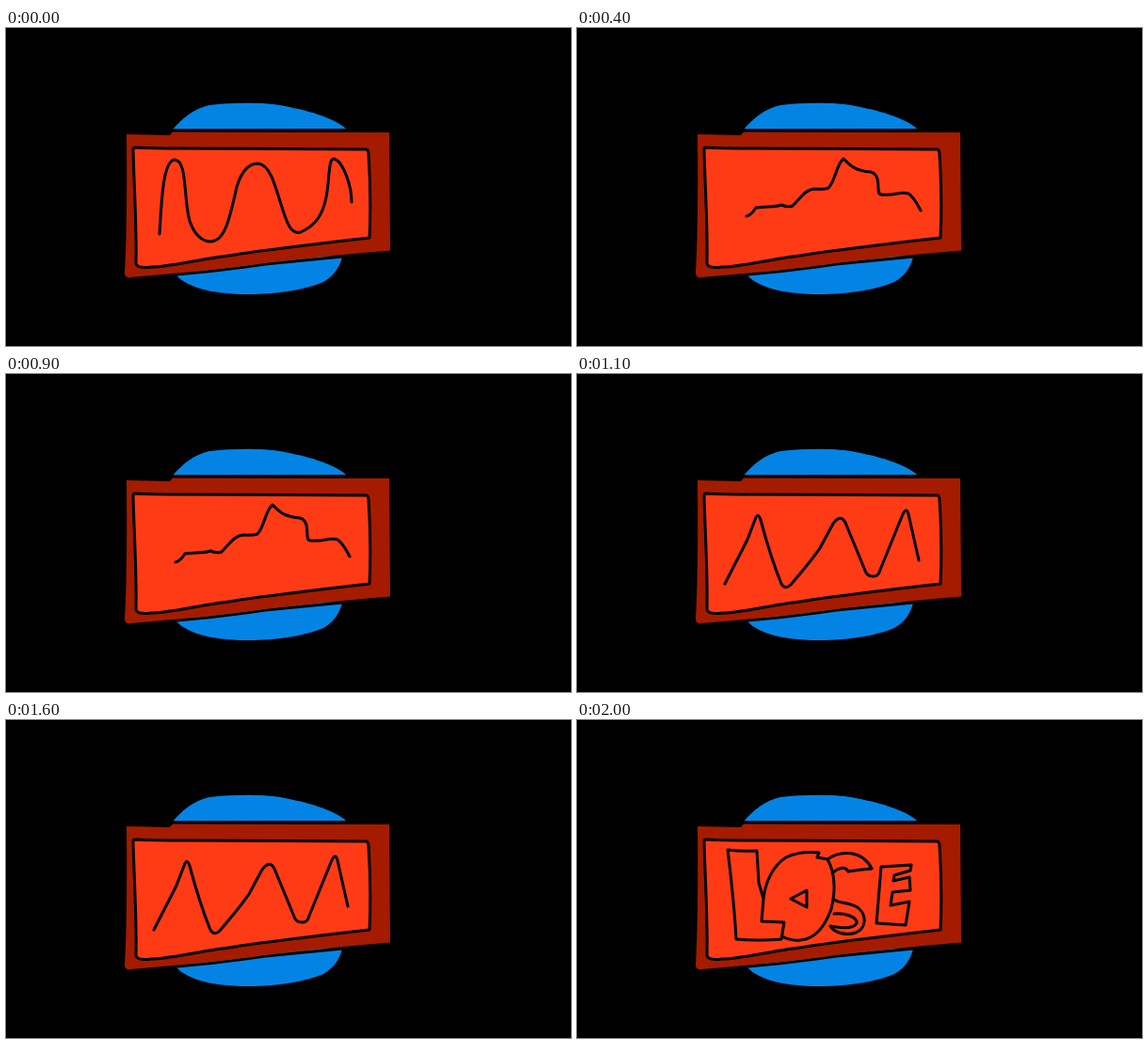
An HTML page that plays this animation: 600x338 px, repeating every 3.7 s.

```html
<!DOCTYPE html>
<html lang="en">
<head>
<meta charset="utf-8">
<title>Sign</title>
<style>
  html, body { margin: 0; width: 100%; height: 100%; overflow: hidden; background: #000; }
  svg { display: block; width: 100vw; height: 100vh; }
  .ink { stroke: #000; stroke-width: 3; stroke-linecap: round; stroke-linejoin: round; }
</style>
</head>
<body>
<svg viewBox="0 0 600 338">
  <g fill="#0384e4">
    <path d="M177 108C187 96 199 86 216 82C240 79 273 79 291 82C318 87 348 95 361 107Z"/>
    <path d="M181 263C194 277 223 283 256 283C291 283 321 277 337 270C348 264 355 253 357 243L270 240Z"/>
  </g>
  <path class="ink" fill="none" d="M177 108.7H361M181 262Q230 258 275 251L357 243"/>
  <path fill="#a41b00" d="M128 113L174 114L177 110.5L407 111L408 236.5Q340 242 275 250C225 257 180 261 132 265Q126 266 126 260Q129 210 128 113Z"/>
  <path class="ink" fill="#ff3b15" d="M137 127Q155 128 190 128L383 129Q385 130 385 134Q388 180 386 223Q350 227 310 232C275 236 250 240 225 243.5C195 248 172 254 154 254Q139 256 138 250C139 213 136 170 135 129Q135 127 137 127Z"/>
  <path class="ink" id="drawing" fill="none"/>
</svg>
<script>
const LOOP = 3700, STEP = 100, WORD_START = 2000;

const waves = [
  // tall rounded wave
  "M163 219C165 190 166 141 179 140C193 141 188 180 195 205C201 222 209 227 218 227C232 226 237 204 243 178C247 155 257 144 267 144C286 145 289 190 301 211Q306 219 313 217C328 210 336 200 340 180C344 160 342 139 348 139C358 141 367 168 367 185",
  // zigzag
  "M157 223L181 176L189 155Q192 146 195 155C203 185 210 206 217 223Q221 230 227 224C238 211 250 197 258 185L272 159Q280 148 285 158L306 209Q308 215 314 215Q320 216 322 208L346 149Q350 141 352 149L363 198",
  // leaning wave
  "M169 222C183 218 200 203 206 189C212 174 210 150 218 150C228 149 226 163 228 178C228 190 223 195 223 205C225 219 234 226 242 226C255 224 263 202 268 187C274 170 273 152 285 152C301 153 299 190 305 208Q307 213 317 213C334 214 343 203 347 187C350 170 344 153 347 151C353 147 361 167 364 187Q366 201 363 211",
  // loose wave
  "M170 211C184 205 190 164 203 164C218 165 215 211 233 212C254 211 258 156 278 155C296 156 292 206 312 206C332 205 332 160 348 159C360 160 367 178 372 194",
  // low ridge
  "M180 200Q185 199 190 191C200 189 210 191 217 188Q224 191 229 189C238 180 243 171 253 171Q262 172 267 170C275 162 275 145 283 139C290 146 295 152 312 153C325 157 316 176 323 177C338 179 343 173 352 176C359 181 361 187 365 194"
];

const word = [
  // L
  "M160 138Q175 140 191 139L193 173L198 190L196 214L220 215L217 233Q193 235 169 233Q167 195 160 138Z",
  // O
  "M198 190C200 172 208 155 222 146C235 140 246 140 257 141L255 146L266 148C274 162 275 180 270 201C263 220 252 233 237 234Q227 235 218 230M227 190L244 181V199Z",
  // S
  "M266 148C280 138 303 138 313 158Q300 159 288 161C285 155 277 157 271 163M272 190C278 196 290 193 299 200C309 209 306 222 296 226C284 230 272 225 269 219C279 221 293 223 297 216C298 209 284 205 273 206",
  // E
  "M323 156L355 154L354 160L337 165L336 171L353 167L354 181L335 183L333 197L353 193L349 218L318 216Z"
].join("");

const drawing = document.getElementById("drawing");

function render() {
  const t = performance.now() % LOOP;
  const path = t < WORD_START ? waves[Math.floor(t / STEP) % waves.length] : word;
  drawing.setAttribute("d", path);
  requestAnimationFrame(render);
}
render();
</script>
</body>
</html>
```
